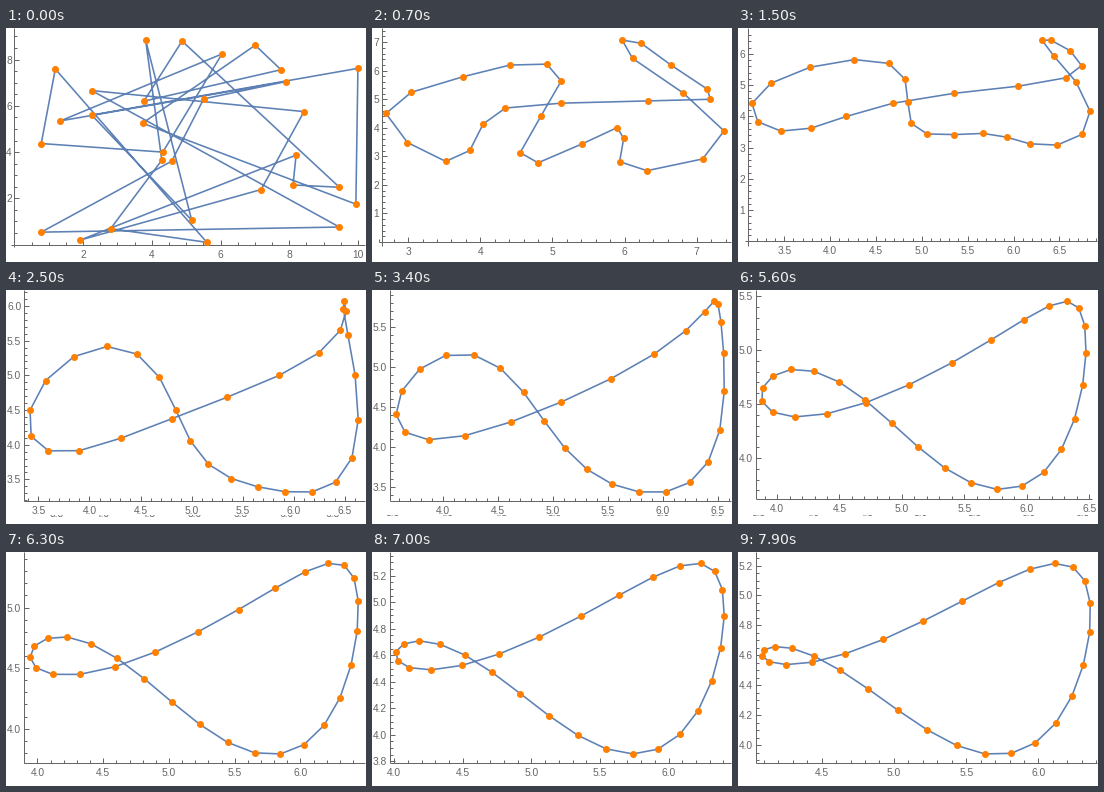
A matplotlib script for the animation above (8 s loop, 360x234 px).

```python
import numpy as np
import matplotlib.pyplot as plt
from matplotlib.animation import FuncAnimation
from matplotlib.patches import Rectangle

W, H, DPI = 360, 234, 100
STEPS = 80
BLUE, ORANGE, GRAY = "#5e81b5", "#ff8000", "#666666"
RIGHT, TOP, ASPECT = 358.8, 1.9, 0.614
LABEL_TOP = 5
PX = 72 / DPI

# vertices of the starting polygon; every later shape follows from them
POLYGON = np.array([
    (10.0, 7.62), (9.94, 1.75), (3.73, 5.25), (7.01, 8.62), (7.76, 7.56),
    (3.77, 6.2), (4.88, 8.8), (9.46, 2.48), (8.11, 2.58), (8.2, 3.87),
    (1.92, 0.2), (7.18, 2.38), (8.43, 5.75), (2.25, 6.66), (9.46, 0.76),
    (0.78, 0.54), (4.58, 3.61), (5.51, 6.3), (7.91, 7.05), (1.34, 5.35),
    (6.04, 8.24), (4.32, 4.0), (0.78, 4.37), (1.19, 7.59), (5.6, 0.1),
    (2.8, 0.69), (4.29, 3.65), (3.82, 8.84), (5.16, 1.06), (2.25, 5.6),
])


def smooth(pts, n):
    """Replace the polygon n times by the midpoints of its edges."""
    for _ in range(n):
        pts = (pts + np.roll(pts, -1, axis=0)) / 2
    return pts


def tick_steps(span):
    """Smallest 1-2-5 step giving at most eight intervals, and its minor."""
    base = 10 ** np.floor(np.log10(span / 8))
    lead = next(m for m in (1, 2, 5, 10) if m * base >= span / 8)
    return lead * base, lead * base / (4 if lead == 2 else 5)


def multiples(lo, hi, step):
    return step * np.arange(np.ceil(lo / step), np.floor(hi / step) + 1)


def label(v, step):
    return f"{v:.0f}" if step >= 1 else f"{v:.1f}"


class Layout:
    """Plot range, ticks and pixel mapping for one polygon."""

    def __init__(self, pts):
        self.pts = pts
        (x0, y0), (x1, y1) = pts.min(axis=0), pts.max(axis=0)
        dx, dy = x1 - x0, y1 - y0
        zero_x, zero_y = x0 < .25 * dx, y0 < .985 * dy
        self.xlo = -.01 * x1 if zero_x else x0 - .02 * dx
        self.xhi = x1 * 1.02 if zero_x else x1 + .02 * dx
        self.ylo = -.012 * y1 - .02 * y0 if zero_y else y0 - .05 * dy
        self.yhi = y1 * 1.05 if zero_y else y1 + .05 * dy
        self.xstep = tick_steps(self.xhi - self.xlo)
        self.ystep = tick_steps(self.yhi - self.ylo)
        self.xmajor = multiples(self.xlo, self.xhi, self.xstep[0])
        self.ymajor = multiples(self.ylo, self.yhi, self.ystep[0])

        whole = self.ystep[0] >= 1
        self.left = 5 if zero_x else 7.2 if whole else 17.5
        self.width = RIGHT - self.left
        # leave room for a label sticking out at the right or the top
        half = 8 if self.xstep[0] < 1 else 6
        last = self.xmajor[-1]
        if self.x(last) + half > 359.3:
            room = 359.3 - half - self.left
            self.width = room * (self.xhi - self.xlo) / (last - self.xlo)
        self.height = self.width * ASPECT
        self.top = TOP
        extra = max(0, LABEL_TOP - self.y(self.ymajor[-1]))
        self.page = int(TOP + self.height + 14) + 5 * (extra > 0)
        self.top += extra

        self.bottom = self.top + self.height
        self.axis_y = self.y(0) if zero_y else self.bottom
        self.axis_x = (self.x(0) if zero_x
                       else self.left + (2.6 if whole else .4))

    def x(self, v):
        return self.left + (v - self.xlo) / (self.xhi - self.xlo) * self.width

    def y(self, v):
        return self.top + (self.yhi - v) / (self.yhi - self.ylo) * self.height


layouts = [Layout(smooth(POLYGON, n)) for n in range(STEPS)]

plt.rcParams["font.family"] = "Liberation Sans"
fig = plt.figure(figsize=(W / DPI, H / DPI), dpi=DPI, facecolor="white")
ax = fig.add_axes([0, 0, 1, 1])


def text(x, y, s, ha, z):
    ax.text(x, y, s, ha=ha, va="center_baseline", color=GRAY,
            fontsize=10.2 * PX, zorder=z)


def line(xs, ys, z):
    ax.plot(xs, ys, color=GRAY, lw=PX, zorder=z, solid_capstyle="butt")


def sheet(lay, z):
    """White page with the labels of the x axis."""
    ax.add_patch(Rectangle((0, 0), W, lay.page, fc="white", ec="none",
                           zorder=z))
    for v in lay.xmajor:
        if abs(v) > 1e-9:
            text(lay.x(v), lay.axis_y + 9, label(v, lay.xstep[0]),
                 "center", z + .1)


def draw_axes(lay, z):
    ox, oy = lay.axis_x, lay.axis_y
    line([lay.left, lay.left + lay.width], [oy, oy], z)
    line([ox, ox], [lay.top - 2, lay.bottom], z)
    for step, size in zip(lay.xstep, (5, 3)):
        for v in multiples(lay.xlo, lay.xhi, step):
            line([lay.x(v)] * 2, [oy, oy - size], z)
    for step, size in zip(lay.ystep, (5, 3)):
        for v in multiples(lay.ylo, lay.yhi, step):
            line([ox, ox + size], [lay.y(v)] * 2, z)
    for v in lay.ymajor:
        if abs(v) > 1e-9:
            text(ox - 2.6, lay.y(v), label(v, lay.ystep[0]), "right", z)


def draw(n):
    ax.clear()
    ax.set(xlim=(0, W), ylim=(H, 0))
    ax.axis("off")
    # taller earlier pages stay visible below the current one
    stack = [n]
    for j in range(n - 1, -1, -1):
        if layouts[j].page > layouts[stack[-1]].page:
            stack.append(j)
    for z, j in enumerate(reversed(stack)):
        sheet(layouts[j], z)

    lay, z = layouts[n], len(stack)
    draw_axes(lay, z)
    loop = np.vstack([lay.pts, lay.pts[:1]])
    xs, ys = lay.x(loop[:, 0]), lay.y(loop[:, 1])
    ax.plot(xs, ys, color=BLUE, lw=1.6 * PX, zorder=z + 1,
            solid_joinstyle="round")
    ax.plot(xs[:-1], ys[:-1], "o", color=ORANGE, ms=7 * PX, mew=0,
            zorder=z + 2)
    return []


anim = FuncAnimation(fig, draw, frames=STEPS, interval=100, repeat=True,
                     repeat_delay=0, init_func=lambda: [])
plt.show()
```
